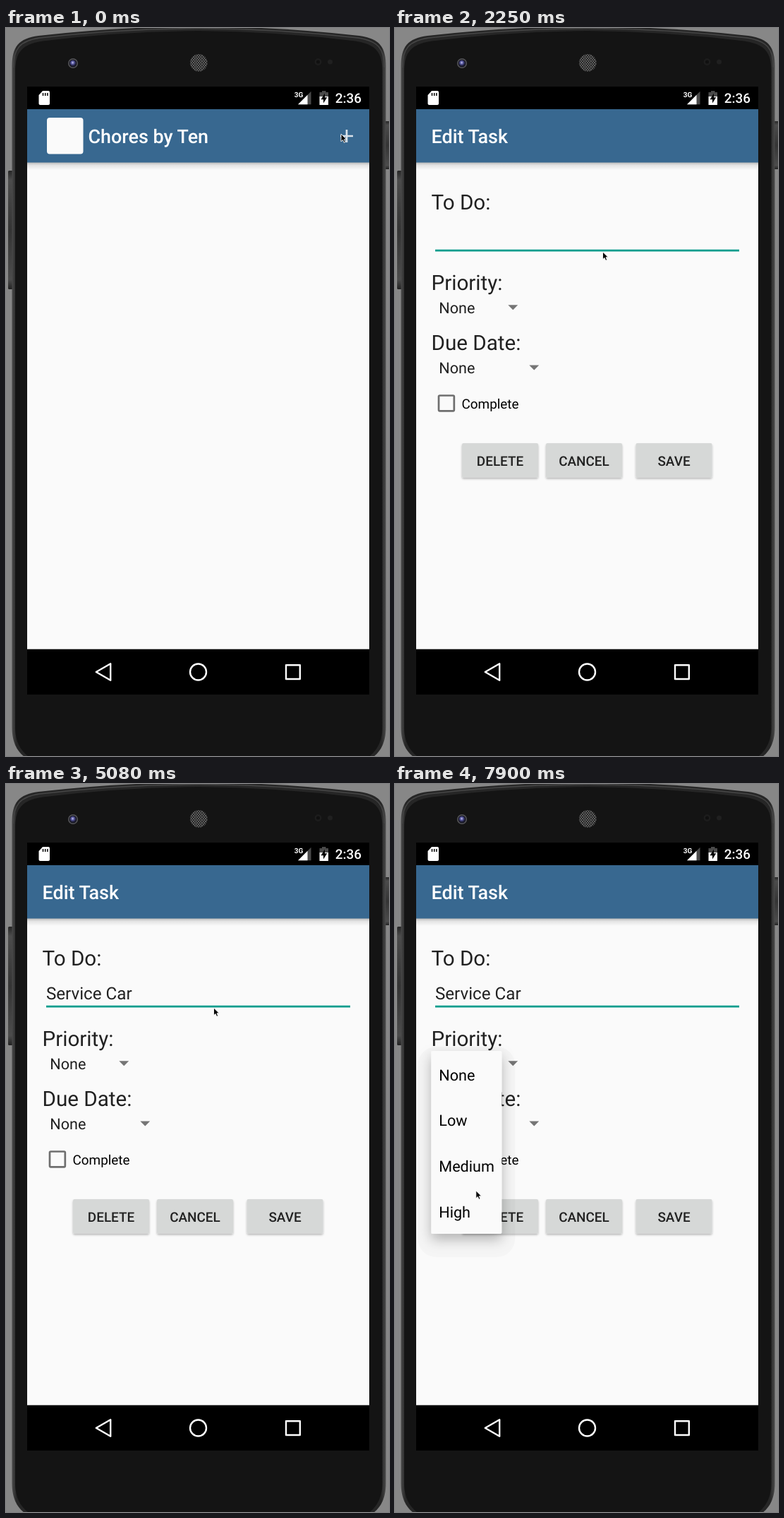
An HTML page for the animation above (8000 ms loop, 543 px wide and 1031 px high).

```html
<!DOCTYPE html>
<html lang="en">
<head>
<meta charset="utf-8">
<title>Task editor</title>
<style>
  html, body { margin: 0; width: 100%; height: 100%; overflow: hidden; background: #878787; }
  svg { display: block; width: 100%; height: 100%; }
  text { font-family: Roboto, sans-serif; fill: #212121; white-space: pre; text-rendering: geometricPrecision; }
  .title { font-size: 26.9px; font-weight: 500; fill: #fff; }
  .label { font-size: 29.6px; }
  .item { font-size: 21.6px; }
  .input { font-size: 24.2px; }
  .check { font-size: 18.9px; fill: #000; }
  .btn { font-size: 18.9px; font-weight: 500; text-anchor: middle; }
  .clock { font-size: 18.9px; font-weight: 500; fill: #fff; }
  #menu text { fill: #000; }
</style>
</head>
<body>
<svg viewBox="0 0 543 1031">
  <defs>
    <linearGradient id="rim" x2="1" y2="0">
      <stop offset="0" stop-color="#4a4a4a"/><stop offset=".012" stop-color="#262626"/>
      <stop offset=".988" stop-color="#262626"/><stop offset="1" stop-color="#4a4a4a"/>
    </linearGradient>
    <linearGradient id="key" x2="0" y2="1">
      <stop offset="0" stop-color="#262626"/><stop offset=".08" stop-color="#4c4c4c"/>
      <stop offset=".5" stop-color="#343434"/><stop offset=".92" stop-color="#4c4c4c"/><stop offset="1" stop-color="#222"/>
    </linearGradient>
    <linearGradient id="fall" x2="0" y2="1">
      <stop offset="0" stop-color="#000" stop-opacity=".27"/>
      <stop offset=".4" stop-color="#000" stop-opacity=".09"/>
      <stop offset="1" stop-color="#000" stop-opacity="0"/>
    </linearGradient>
    <radialGradient id="lens" cx=".45" cy=".4">
      <stop offset="0" stop-color="#d0d0f4"/><stop offset=".45" stop-color="#5a5aa4"/><stop offset="1" stop-color="#1c1c34"/>
    </radialGradient>
    <pattern id="mesh" width="3.4" height="4" patternUnits="userSpaceOnUse">
      <rect width="3.4" height="4" fill="#1d1d1d"/>
      <g fill="#777"><circle cx=".85" cy="1" r=".95"/><circle cx="2.55" cy="3" r=".95"/></g>
    </pattern>
    <filter id="lift" x="-20%" y="-20%" width="140%" height="150%">
      <feDropShadow dx="0" dy="2" stdDeviation="1.5" flood-opacity=".28"/>
    </filter>
    <filter id="float" x="-50%" y="-30%" width="200%" height="160%">
      <feDropShadow dx="0" dy="8" stdDeviation="9" flood-opacity=".27"/>
    </filter>
    <clipPath id="barClip"><rect x="30" y="115" width="485" height="75.5"/></clipPath>
    <clipPath id="screenClip"><rect x="30" y="83" width="485" height="861"/></clipPath>
    <clipPath id="menuClip"><rect id="menuMask" x="52" y="378"/></clipPath>
  </defs>

  <!-- handset -->
  <rect width="543" height="1031" fill="#878787"/>
  <rect x="3" y="202" width="8" height="168" rx="1.5" fill="url(#key)"/>
  <rect x="536" y="132" width="9" height="68" rx="1.5" fill="url(#key)"/>
  <path d="M8.500 54C8.500 26 18 15 46 11Q160 -2 273 -2Q386 -2 501 11C529 15 538.500 26 538.500 54V990C538.500 1012 531 1026 518 1034H29C16 1026 8.500 1012 8.500 990Z" fill="url(#rim)"/>
  <path d="M10.500 56C10.500 29 20 18 48 14Q160 1 273 .5Q386 1 499 14C527 18 536.500 29 536.500 56" fill="none" stroke="#464646" stroke-width="1.500"/>
  <path d="M13 62C13 34 23 23 52 18.500Q160 5 273 4Q386 5 495 18.500C524 23 533.500 34 533.500 62V990C533.500 1010 526 1024 512 1034H35C20 1024 13 1010 13 990Z" fill="#141414"/>
  <circle cx="95" cy="50" r="7" fill="#56565a"/>
  <circle cx="95" cy="50" r="5.500" fill="#15151c"/>
  <circle cx="95" cy="50" r="4.600" fill="url(#lens)"/>
  <circle cx="273.300" cy="49.300" r="12.300" fill="url(#mesh)"/>
  <circle cx="442.500" cy="48" r="5" fill="#1d1d1d"/><circle cx="442.500" cy="48" r="2.500" fill="#101010"/>
  <circle cx="459.500" cy="48" r="3.500" fill="#202020"/>
  <rect x="30" y="83" width="485" height="861" fill="#000"/>

  <!-- task list -->
  <g id="list">
    <rect x="30" y="115" width="485" height="764.700" fill="#fafafa"/>
    <rect x="30" y="190" width="485" height="11" fill="url(#fall)"/>
    <rect x="30" y="115" width="485" height="75.500" fill="#386890"/>
    <rect x="58" y="127" width="51.500" height="51.500" rx="4" fill="#fafafa"/>
    <text class="title" x="116.500" y="163.400">Chores by Ten</text>
    <circle id="addRipple" cx="483" cy="153" r="32" fill="#fff" opacity=".16" clip-path="url(#barClip)"/>
    <path d="M474 153H492M483 144V162" stroke="#d9e2ea" stroke-width="2.700"/>
  </g>

  <!-- task form -->
  <g id="form">
    <rect x="30" y="110" width="485" height="5" fill="#000"/>
    <rect x="30" y="115" width="485" height="764.700" fill="#fafafa"/>
    <rect x="30" y="190" width="485" height="11" fill="url(#fall)"/>
    <rect x="30" y="115" width="485" height="75.500" fill="#386890"/>
    <text class="title" x="51.500" y="163.400">Edit Task</text>
    <text class="label" x="51.500" y="257">To Do:</text>
    <text class="input" id="input" x="56.900" y="304.500"></text>
    <rect id="caret" y="278" width="2.700" height="33" fill="#0b9d8d"/>
    <rect x="57" y="313.700" width="431" height="2.800" fill="#0b9d8d"/>
    <text class="label" x="51.500" y="371">Priority:</text>
    <circle id="pickRipple" cx="167" cy="395" r="26.500" fill="#000" opacity=".065"/>
    <text class="item" x="62.300" y="403.700">None</text>
    <path d="M160.300 392.200H174.200L167.250 399.200Z" fill="#757575"/>
    <text class="label" x="51.500" y="456">Due Date:</text>
    <text class="item" x="62.300" y="488.700">None</text>
    <path d="M190.300 477.500H204.200L197.250 484.500Z" fill="#757575"/>
    <rect x="62" y="520.500" width="21.800" height="21.800" rx="1.500" fill="none" stroke="#6f6f6f" stroke-width="2.700"/>
    <text class="check" x="94.500" y="539">Complete</text>
    <g id="buttons"></g>
  </g>

  <g id="menu" clip-path="url(#screenClip)">
    <rect id="menuHalo" y="372" width="138" rx="26" fill="#000" opacity=".02"/>
    <rect id="menuBox" y="378" rx="2" fill="#fafafa" filter="url(#float)"/>
    <g clip-path="url(#menuClip)"><g id="menuItems"></g></g>
  </g>

  <!-- status bar -->
  <path d="M52 89H60Q62 89 62 91V107Q62 109 60 109H48.500Q46.500 109 46.500 107V95Z" fill="#fff"/>
  <path d="M52.500 92V96M55.700 92V96M58.900 92V96" stroke="#000" stroke-width="1.500"/>
  <text x="408.800" y="98" font-size="10" style="font-weight:700;fill:#fff">3G</text>
  <path d="M414 108.300L432.500 89.800V108.300Z" fill="#4a4a4a"/>
  <path d="M414 108.300L427.500 94.800V108.300Z" fill="#fff"/>
  <path d="M448 89H453.500V91H457V97H444.500V91H448Z" fill="#4a4a4a"/>
  <path d="M444.500 97H457V109H444.500Z" fill="#fff"/>
  <path d="M452 92.500L446.500 101.200H450V106.500L455.200 98.300H452Z" fill="#000"/>
  <text class="clock" x="466.800" y="106.300">2:36</text>

  <!-- navigation bar -->
  <g fill="none" stroke="#fff" stroke-width="2.400" stroke-linejoin="round">
    <path d="M127.800 912L148.200 900.300V923.700Z"/>
    <circle cx="272.500" cy="912" r="11.500"/>
    <rect x="397" y="902.200" width="19.800" height="19.800"/>
  </g>

  <path id="cursor" d="M0 0V10.800L2.500 8.500L4.200 12.300L6.200 11.400L4.500 7.800H7.800Z" fill="#000" stroke="#fff" stroke-width=".9" stroke-linejoin="round"/>
</svg>
<script>
const LOOP = 8000;
const $ = id => document.getElementById(id);
const show = (id, on) => $(id).setAttribute('visibility', on ? 'visible' : 'hidden');
const set = (id, attrs) => { for (const k in attrs) $(id).setAttribute(k, attrs[k]); };

// Each row is [start time, ...values]; a row holds until the next begins.
const pointer = [
  [0, 475, 150], [1200, 452, 174], [1350, 382, 245], [1500, 312, 306], [1650, 294.5, 317],
  [5380, 268, 332], [5530, 140, 405], [5680, 3, 488], [5820, 52, 452], [5970, 92.5, 418],
  [6120, 99, 408], [6270, 103, 402], [7010, 104, 414], [7160, 106, 440], [7310, 109, 474],
  [7460, 111, 506], [7610, 113.5, 530], [7760, 114, 558], [7900, 114.8, 576]
];
const PHRASE = 'Service Car';
const typed = [
  [0, 0], [3150, 1], [3300, 2], [3450, 3], [3750, 4], [3900, 5],
  [4040, 7], [4190, 8], [4340, 9], [4640, 11]
];
const blink = [
  [0, 1], [1200, 0], [1650, 1], [2250, 0], [2700, 1], [5080, 0], [5530, 1], [6120, 0]
];
// visible, height, item shift x, item shift y, opacity
const popup = [
  [0, 0, 0, 0, 0, 0], [6570, 1, 160, 1, -24, .75], [6710, 1, 248, 1, -6, 1], [6860, 1, 259, 0, 0, 1]
];

const at = (rows, t) => rows.findLast(r => r[0] <= t).slice(1);

const pen = document.createElement('canvas').getContext('2d');
const textWidth = s => {
  pen.font = '24.2px Roboto, sans-serif';
  return pen.measureText(s).width;
};

$('buttons').innerHTML = [['DELETE', 95], ['CANCEL', 214], ['SAVE', 341.5]].map(([name, x]) =>
  `<rect x="${x}" y="588" width="108" height="48.500" rx="2" fill="#d6d8d7" filter="url(#lift)"/>
   <text class="btn" x="${x + 54}" y="619.700">${name}</text>`).join('');

$('menuItems').innerHTML = ['None', 'Low', 'Medium', 'High'].map((name, i) =>
  `<text class="item" x="62.300" y="${419.7 + i * 64.6}">${name}</text>`).join('');

function draw(t) {
  const opening = t >= 600 && t < 750;
  const sliding = t >= 750 && t < 900;
  show('list', t < 900);
  show('addRipple', opening);
  show('form', t >= 750);
  set('form', { transform: `translate(0 ${sliding ? 4 : 0})`, opacity: sliding ? .985 : 1 });

  const text = PHRASE.slice(0, at(typed, t)[0]);
  $('input').textContent = text;
  set('caret', { x: 57 + textWidth(text), opacity: at(blink, t)[0] });
  set('pickRipple', { opacity: t >= 6270 && t < 6860 ? .065 : 0 });

  const [open, height, dx, dy, alpha] = at(popup, t);
  const left = 51.3 + dx * .7;
  show('menu', open);
  set('menu', { opacity: alpha });
  set('menuHalo', { x: left - 19, height: height + 39 });
  set('menuBox', { x: left, width: 100, height });
  set('menuMask', { width: 100, height });
  set('menuItems', { transform: `translate(${dx} ${dy})` });

  const [x, y] = at(pointer, t);
  set('cursor', { transform: `translate(${x} ${y})` });
}

const start = performance.now();
function tick() {
  draw((performance.now() - start) % LOOP);
  requestAnimationFrame(tick);
}
tick();
</script>
</body>
</html>
```
